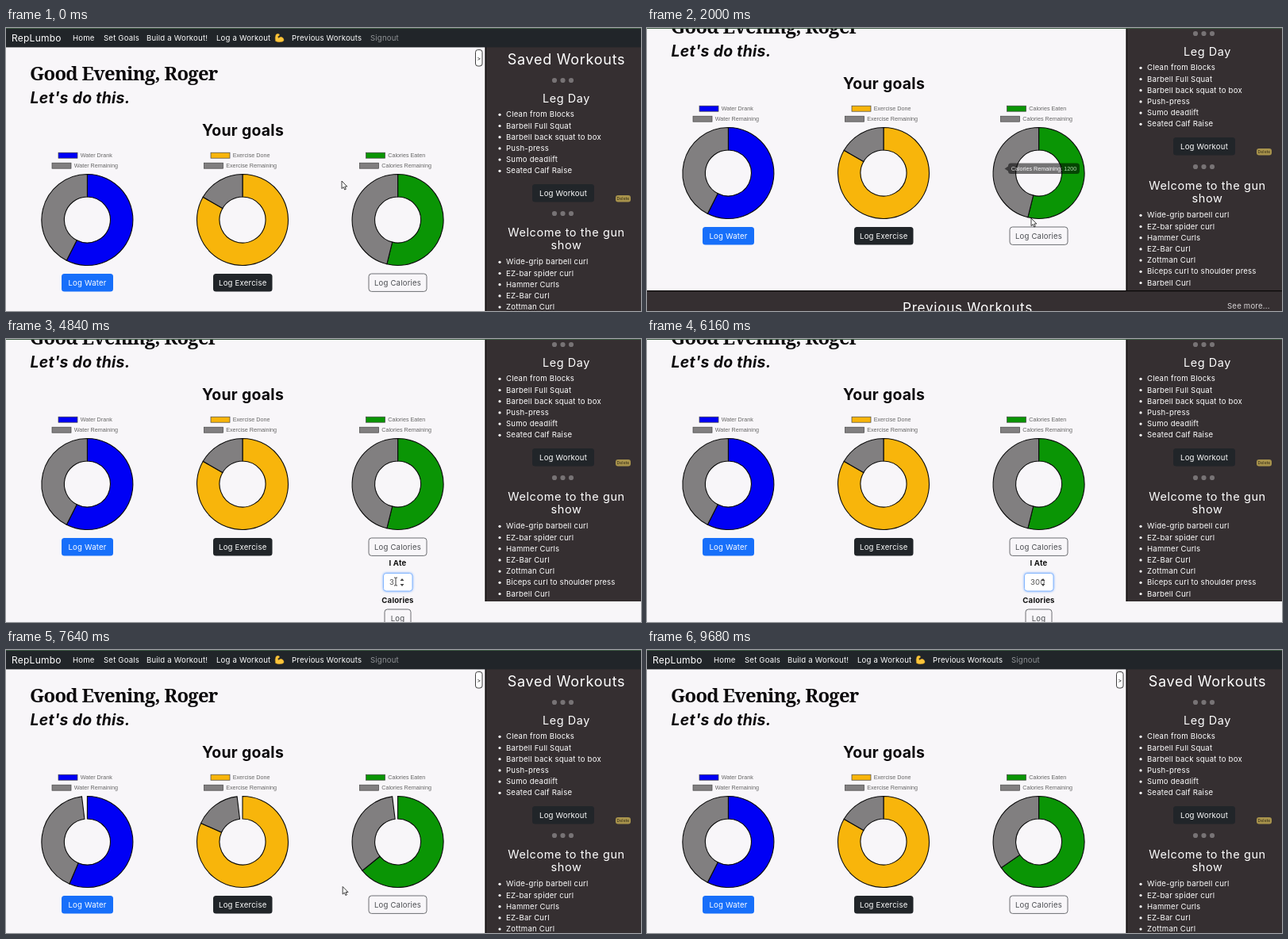
Animation, 800 px wide and 357 px high, one loop 9.72 s. Source, as an HTML page:

```html
<!DOCTYPE html>
<html lang="en">
<head>
<meta charset="utf-8">
<title>Workout dashboard</title>
<style>
html, body { margin: 0; width: 100%; height: 100%; overflow: hidden; background: #f8f6f9; }
svg { display: block; width: 800px; height: 357px; }
text { font: 9.6px Inter, sans-serif; letter-spacing: .02em; white-space: pre; }
.mid { text-anchor: middle; }
.bold { font-weight: 700; }
.title { letter-spacing: .04em; }
.head { font-size: 19.4px; font-weight: 700; letter-spacing: .015em; }
.hello { font: 700 23.8px "Noto Serif", serif; letter-spacing: -.03em; }
.small { font: 7.2px "Liberation Sans", Arial, sans-serif; letter-spacing: 0; }
</style>
</head>
<body>
<svg id="stage" viewBox="0 0 800 357">
  <rect width="800" height="357" fill="#f8f6f9"/>
  <g id="page"></g>
  <g id="cursor">
    <path id="arrow" d="M0 0V9.6L2.2 7.6L3.7 11L5.3 10.3L3.8 7H6.8Z" fill="#fff" stroke="#111" stroke-width=".8"/>
    <path id="hand" d="M-1 0Q0-1 1 0V4L5 5Q6 5.500 5.500 8L4.500 11H-1L-4 7Q-4 5-2.500 6L-1 7Z" fill="#fff" stroke="#111" stroke-width=".8"/>
    <path id="beam" d="M-2-5H-.5L0-4.500L.5-5H2M0-4.500V4.500M-2 5H-.5L0 4.500L.5 5H2" fill="none" stroke="#222" stroke-width=".9"/>
  </g>
  <rect width="800" height="1" fill="#3c5a42"/>
</svg>
<script>
const LOOP = 9720, OPEN = 2600, SUBMIT = 6700, DRAW = 7013;
const DARK = '#212529', PANEL = '#352f31', GREY = '#817f80';
const $ = id => document.getElementById(id);
const page = $('page');

function el(parent, tag, attrs = {}, content) {
  const node = document.createElementNS('http://www.w3.org/2000/svg', tag);
  for (const key in attrs) node.setAttribute(key, attrs[key]);
  if (content !== undefined) node.textContent = content;
  parent.append(node);
  return node;
}
const group = parent => el(parent, 'g');
const rect = (parent, x, y, width, height, fill, more) =>
  el(parent, 'rect', { x, y, width, height, fill, ...more });
const text = (parent, x, y, content, fill, cls = '', size) =>
  el(parent, 'text', { x, y, fill, class: cls, ...(size && { style: `font-size:${size}px` }) }, content);

function button(parent, x, y, w, label, fill, outline) {
  const box = rect(parent, x, y, w, 22.4, fill, { rx: 3.5, stroke: outline || 'none', 'stroke-width': .8 });
  const caption = text(parent, x + w / 2, y + 14.7, label, outline || '#fff', 'mid');
  return { box, caption };
}

// Side panel
const side = group(page);
rect(side, 603.6, 24, 197, 366, PANEL);
rect(side, 603.6, 24, 1.3, 366, '#0b0909');
const title = (y, label, size) => text(side, 706, y, label, '#fff', 'mid title', size);
const dots = y => [691, 701.5, 712].forEach(cx => el(side, 'circle', { cx, cy: y, r: 3.1, fill: '#777375' }));
const list = (y, items) => items.forEach((item, i) => {
  const cy = y + i * 14.2;
  el(side, 'circle', { cx: 622, cy: cy + .3, r: 1.6, fill: '#fff' });
  text(side, 630, cy + 3.4, item, '#fff');
});
title(46, 'Saved Workouts', 18);
dots(66);
title(94, 'Leg Day', 14.4);
list(109, ['Clean from Blocks', 'Barbell Full Squat', 'Barbell back squat to box',
  'Push-press', 'Sumo deadlift', 'Seated Calf Raise']);
button(side, 663, 197, 78, 'Log Workout', DARK);
rect(side, 768, 211, 19, 8.5, '#a8934c', { rx: 3 });
text(side, 777.5, 217, 'Delete', '#2c2614', 'mid', 5);
dots(234);
title(262.5, 'Welcome to the gun', 14.5);
title(279, 'show', 14.5);
list(295, ['Wide-grip barbell curl', 'EZ-bar spider curl', 'Hammer Curls', 'EZ-Bar Curl',
  'Zottman Curl', 'Biceps curl to shoulder press', 'Barbell Curl']);

// Navigation
rect(page, 0, 0, 800, 24.4, DARK);
text(page, 7, 17, 'RepLumbo', '#fff', '', 12);
[[84, 'Home'], [123, 'Set Goals'], [177, 'Build a Workout!'], [265, 'Log a Workout'],
  [360, 'Previous Workouts'], [459, 'Signout']].forEach(([x, label]) =>
  text(page, x, 16, label, label === 'Signout' ? '#909396' : '#fff'));
el(page, 'path', {
  d: 'M340 8.500Q342 6.500 344.500 8L344 10L342.500 10.300L343 13Q346 10 349 12.500Q351.500 16 348 17.300Q343 18.500 339.500 16.500Q338.500 12 340 8.500Z',
  fill: '#fbc53a', stroke: '#d99a22', 'stroke-width': .4
});

// Greeting
text(page, 30, 66, 'Good Evening, Roger', '#0c0a0c', 'hello');
text(page, 30.5, 95, "Let's do this.", '#0c0a0c', 'head').style.fontStyle = 'italic';
text(page, 298.5, 136, 'Your goals', '#0c0a0c', 'head mid');
rect(page, 591.5, 27.5, 8.5, 20.5, '#fff', { rx: 3, stroke: '#111', 'stroke-width': .8 });
text(page, 595.8, 40.5, '>', '#111', 'mid', 7);

// Charts
const charts = [
  { x: 102.4, name: 'Water', verb: 'Drank', color: '#0000f5', share: .575, keys: [66, 58] },
  { x: 298, name: 'Exercise', verb: 'Done', color: '#f8b50b', share: 5 / 6, keys: [258, 249.5] },
  { x: 493.6, name: 'Calories', verb: 'Eaten', color: '#0a9505', share: 1400 / 2600, keys: [453.5, 445.5] }
];
const rings = group(page);
for (const c of charts) {
  c.node = group(rings);
  [[c.color, c.verb], [GREY, 'Remaining']].forEach(([fill, word], i) => {
    const y = 157.2 + i * 13;
    rect(c.node, c.keys[i], y, 24, 7, fill, { stroke: '#444', 'stroke-width': .7 });
    text(c.node, c.keys[i] + 27.7, y + 5.9, `${c.name} ${word}`, '#666', 'small');
  });
  c.arcs = [c.color, GREY].map(fill => el(c.node, 'path', { fill, stroke: '#0a0a0a', 'stroke-width': 1.1 }));
}
button(page, 70, 310, 65, 'Log Water', '#176ffa');
button(page, 261, 310, 74.5, 'Log Exercise', DARK);
const logCalories = button(page, 457, 310, 73, 'Log Calories', '#f8f6f9', '#4b4d51');

function sector(cx, from, to) {
  const cy = 242, R = 57.5, r = 29;
  const at = (radius, turn) => {
    const a = turn * 2 * Math.PI;
    return `${cx + radius * Math.sin(a)} ${cy - radius * Math.cos(a)}`;
  };
  const big = to - from > .5 ? 1 : 0;
  return `M${at(R, from)}A${R} ${R} 0 ${big} 1 ${at(R, to)}L${at(r, to)}A${r} ${r} 0 ${big} 0 ${at(r, from)}Z`;
}

function tooltip(x, y, w, label, caret) {
  const g = group(page);
  rect(g, x, y, w, 13.5, '#000', { rx: 3.5, 'fill-opacity': .8 });
  const edge = caret < x ? x : x + w;
  el(g, 'path', { d: `M${edge} ${y + 4}L${caret} ${y + 7}L${edge} ${y + 10}Z`, 'fill-opacity': .8 });
  text(g, x + w / 2, y + 9.4, label, '#fff', 'small mid');
  return g;
}
const tipCalories = tooltip(455, 229.5, 90, 'Calories Remaining: 1200', 450.5);
const tipExercise = tooltip(250, 273, 63.5, 'Exercise Done: 50', 318);

// Calorie form
const form = group(page);
text(form, 493.5, 345.3, 'I Ate', '#111', 'bold mid');
const ring = rect(form, 475.5, 354.5, 36.5, 22.5, '#fff', { rx: 3.5 });
const amount = text(form, 483, 369.2, '', '#555');
el(form, 'path', { d: 'M496.500 364L499 361L501.500 364ZM496.500 368L499 371L501.500 368Z', fill: '#444' });
text(form, 493.5, 391.8, 'Calories', '#111', 'bold mid');
button(form, 477, 400, 33, 'Log', '#f8f6f9', '#4b4d51');

// Footer
const footer = group(page);
rect(footer, 0, 390, 800, 80, PANEL);
rect(footer, 0, 390, 800, 1.3, '#0b0909');
text(footer, 404, 418, 'Previous Workouts', '#fff', 'mid title', 17.2);
text(footer, 731, 412.8, 'See more...', '#d8d5d6');

const path = [[0, 423, 193], [700, 423, 193], [1200, 418, 199], [1500, 425, 205], [2000, 484, 240],
  [2300, 492, 258], [2800, 492, 258], [3500, 491, 306], [7300, 491, 306], [7700, 420, 298],
  [8020, 318, 276], [8400, 355, 68], [8850, 390, -16], [LOOP, 390, -16]];
const clamp = v => Math.min(1, Math.max(0, v));
const smooth = v => v * v * (3 - 2 * v);
const between = (t, a, b) => t >= a && t < b;
const fade = (t, a, b, c, d) => clamp((t - a) / (b - a)) * clamp((d - t) / (d - c));
const show = (node, on) => { node.style.display = on ? '' : 'none'; };

function render(t) {
  const scroll = t < SUBMIT ? 59 * smooth(clamp((t - 1480) / 300)) : 0;
  page.setAttribute('transform', `translate(0 ${-scroll})`);

  const opened = between(t, OPEN, SUBMIT);
  show(form, opened);
  show(footer, !opened);
  const hover = between(t, 2180, 3050);
  logCalories.box.setAttribute('fill', hover ? DARK : '#f8f6f9');
  logCalories.caption.setAttribute('fill', hover ? '#fff' : '#4b4d51');
  const focus = t > 3800;
  ring.setAttribute('stroke', focus ? '#86b7fe' : '#ced4da');
  ring.style.filter = focus ? 'drop-shadow(0 0 1.5px #79aefe)' : 'none';
  amount.textContent = '300'.slice(0, [4700, 5150, 5400].filter(k => t >= k).length);

  const reload = t >= SUBMIT;
  const grow = reload ? 1 - (1 - clamp((t - DRAW) / 1000)) ** 4 : 1;
  show(rings, grow > 0);
  charts[2].share = (reload ? 1700 : 1400) / 2600;
  for (const { x, share, arcs } of charts) {
    arcs[0].setAttribute('d', sector(x, 0, share * grow));
    arcs[1].setAttribute('d', sector(x, share * grow, grow));
  }
  tipCalories.setAttribute('opacity', fade(t, 1720, 1880, 1900, 2200));
  tipExercise.setAttribute('opacity', fade(t, 7850, 8050, 8120, 8440));

  const i = Math.max(1, path.findIndex(k => k[0] > t));
  const [t0, x0, y0] = path[i - 1], [t1, x1, y1] = path[i];
  const k = smooth((t - t0) / (t1 - t0));
  $('cursor').setAttribute('transform', `translate(${x0 + (x1 - x0) * k} ${y0 + (y1 - y0) * k})`);
  const beam = between(t, 3350, SUBMIT);
  show($('cursor'), !between(t, 6100, 7300));
  show($('beam'), beam);
  show($('hand'), hover);
  show($('arrow'), !beam && !hover);
}

const start = performance.now();
(function tick() {
  render((performance.now() - start) % LOOP);
  requestAnimationFrame(tick);
})();
</script>
</body>
</html>
```
